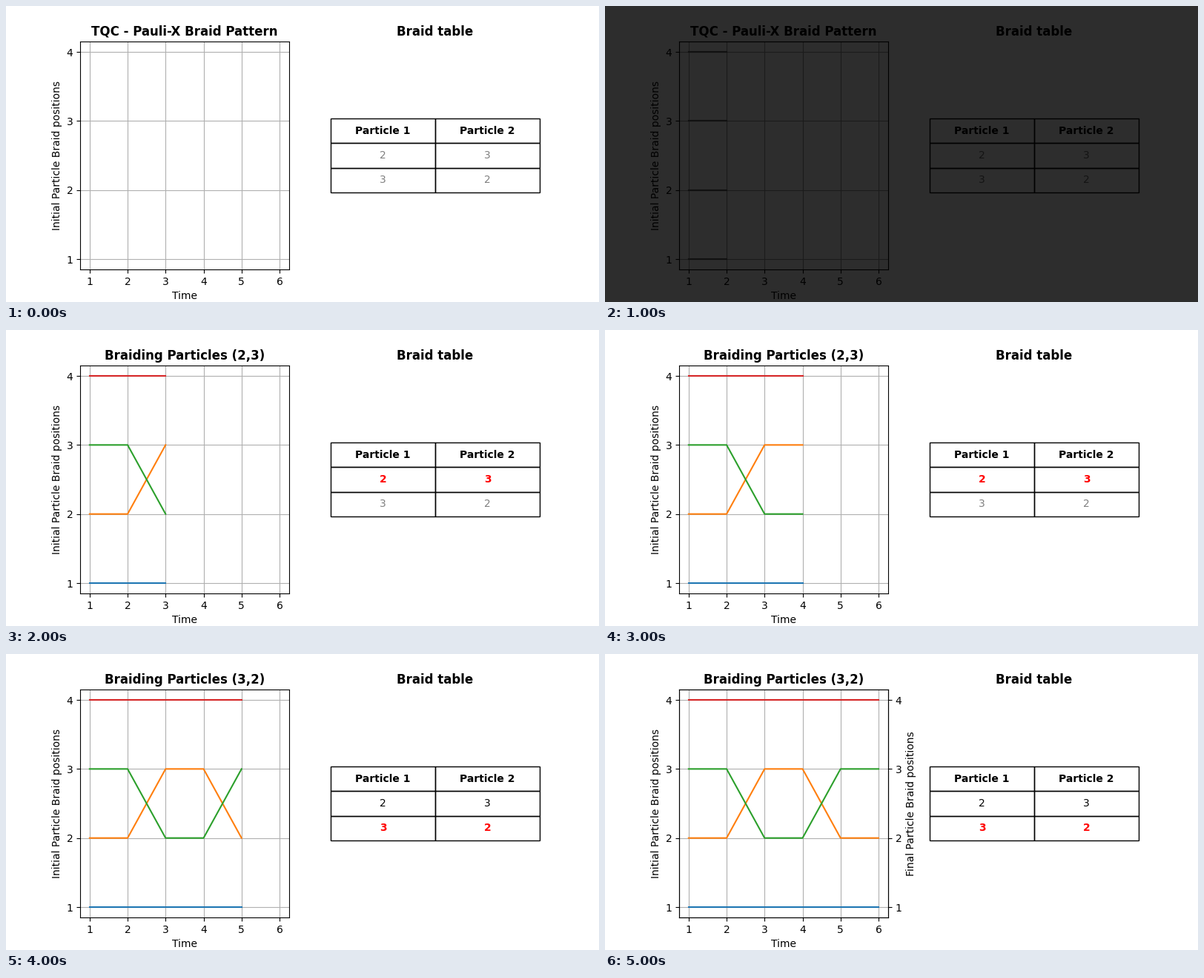
A matplotlib script for the animation above (6000 ms loop, 800x400 px).

```python
import matplotlib.pyplot as plt
from matplotlib.animation import FuncAnimation

STEPS = 6
SWAPS = [(2, 3), (3, 2)]
LIGHT = dict(back="white", grid="#b0b0b0", idle="gray",
             strands=["tab:blue", "tab:orange", "tab:green", "tab:red"])
DARK = dict(back="#2d2d2d", grid="#1b1b1b", idle="#141414",
            strands=["#111111"] * 4)


def braid_paths():
    """Position of each strand at times 1..6; a swap takes every other step."""
    pos = [1, 2, 3, 4]
    paths = [[p, p] for p in pos]
    for a, b in SWAPS:
        pos = [b if p == a else a if p == b else p for p in pos]
        for path, p in zip(paths, pos):
            path += [p, p]
    return paths


paths = braid_paths()
plt.rcParams["font.family"] = "DejaVu Sans"
fig, (ax, side) = plt.subplots(1, 2, figsize=(8, 4), dpi=100)

ax.set_facecolor("none")
ax.set_xlim(0.75, 6.25)
ax.set_ylim(0.85, 4.15)
ax.set_xticks(range(1, 7))
ax.set_yticks(range(1, 5))
ax.set_xlabel("Time")
ax.set_ylabel("Initial Particle Braid positions")
title = ax.set_title("", fontweight="bold")
strands = [ax.plot([], [])[0] for _ in paths]

final = ax.twinx()
final.set_ylim(ax.get_ylim())
final.set_yticks(range(1, 5))
final.set_ylabel("Final Particle Braid positions")

side.axis("off")
side.set_title("Braid table", fontweight="bold")
table = side.table(cellText=[[str(n) for n in pair] for pair in SWAPS],
                   colLabels=["Particle 1", "Particle 2"],
                   cellLoc="center", loc="center")
table.auto_set_font_size(False)
table.set_fontsize(10)
table.scale(1, 2)
for (row, _), cell in table.get_celld().items():
    cell.set_facecolor("none")
    if row == 0:
        cell.set_text_props(weight="bold")


def update(i):
    look = DARK if i == 1 else LIGHT
    fig.set_facecolor(look["back"])
    ax.grid(True, color=look["grid"])

    active = i // 2  # table row being braided, 0 before the first swap
    if active:
        a, b = SWAPS[active - 1]
        title.set_text(f"Braiding Particles ({a},{b})")
    else:
        title.set_text("TQC - Pauli-X Braid Pattern")

    count = i + 1 if i else 0
    for line, path, color in zip(strands, paths, look["strands"]):
        line.set_data(range(1, count + 1), path[:count])
        line.set_color(color)

    for (row, _), cell in table.get_celld().items():
        if row == 0:
            continue
        if row == active:
            cell.set_text_props(color="red", weight="bold")
        else:
            color = "black" if row < active else look["idle"]
            cell.set_text_props(color=color, weight="normal")

    final.set_visible(i == STEPS - 1)
    return []


anim = FuncAnimation(fig, update, frames=STEPS, interval=1000,
                     init_func=lambda: update(0), repeat=True,
                     repeat_delay=0, blit=False)
plt.show()
```
